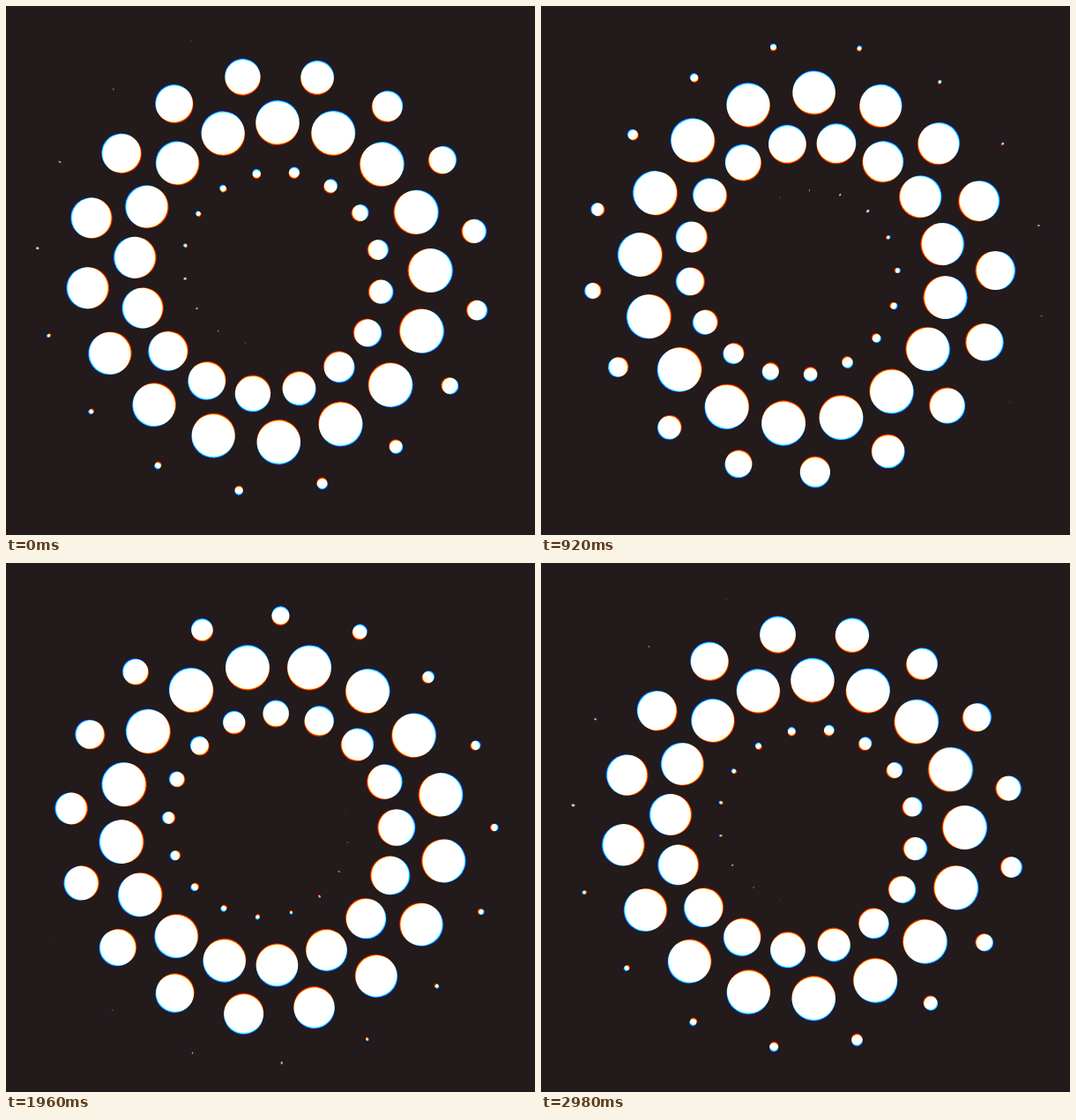
Animation of 600x600 px, one loop 3000 ms. Source, as an HTML page without scripts:

```html
<!DOCTYPE html>
<html lang="en">
<head>
<meta charset="utf-8">
<title>Spiral dots</title>
<style>
html, body { margin: 0; width: 100%; height: 100%; overflow: hidden; background: #231a1b; }
svg { display: block; width: 600px; height: 600px; }

/* one layer per colour channel, each shifted slightly along the radius */
.layer { transform: translate(300px, 300px); mix-blend-mode: lighten; }
.red { fill: #f00; --shift: -1px; }
.green { fill: #0f0; --shift: .2px; }
.blue { fill: #00f; --shift: 1px; }

/* 6 arms of 11 dots make a spiral with 16.5 dots per turn */
.layer g { --g: 0; }
g:nth-child(2) { --g: 1; }
g:nth-child(3) { --g: 2; }
g:nth-child(4) { --g: 3; }
g:nth-child(5) { --g: 4; }
g:nth-child(6) { --g: 5; }
circle { --n: 0; }
circle:nth-child(2) { --n: 1; }
circle:nth-child(3) { --n: 2; }
circle:nth-child(4) { --n: 3; }
circle:nth-child(5) { --n: 4; }
circle:nth-child(6) { --n: 5; }
circle:nth-child(7) { --n: 6; }
circle:nth-child(8) { --n: 7; }
circle:nth-child(9) { --n: 8; }
circle:nth-child(10) { --n: 9; }
circle:nth-child(11) { --n: 10; }

circle {
  --j: calc(var(--g) * 11 + var(--n));
  --speed-up: cubic-bezier(.33333, 0, .66667, 0);
  --slow-down: cubic-bezier(.33333, 1, .66667, 1);
  transform: rotate(calc(var(--j) * 240deg / 11));
  animation: drift 6s linear infinite, swell 6s infinite;
  animation-delay: calc(var(--j) * -1s / 11);
}
@keyframes drift {
  from { cx: calc(70.4px + var(--shift)); }
  to { cx: calc(292.4px + var(--shift)); }
}
/* cubic ease in-out, up and back down */
@keyframes swell {
  0% { r: 0px; animation-timing-function: cubic-bezier(.33333, 0, .66667, 0); }
  25% { r: 12.5px; animation-timing-function: cubic-bezier(.33333, 1, .66667, 1); }
  50% { r: 25px; animation-timing-function: cubic-bezier(.33333, 0, .66667, 0); }
  75% { r: 12.5px; animation-timing-function: cubic-bezier(.33333, 1, .66667, 1); }
  100% { r: 0px; }
}
</style>
</head>
<body>
<svg width="600" height="600">
<rect width="600" height="600" fill="#231a1b"/>
<g class="layer red">
<g><circle/><circle/><circle/><circle/><circle/><circle/><circle/><circle/><circle/><circle/><circle/></g>
<g><circle/><circle/><circle/><circle/><circle/><circle/><circle/><circle/><circle/><circle/><circle/></g>
<g><circle/><circle/><circle/><circle/><circle/><circle/><circle/><circle/><circle/><circle/><circle/></g>
<g><circle/><circle/><circle/><circle/><circle/><circle/><circle/><circle/><circle/><circle/><circle/></g>
<g><circle/><circle/><circle/><circle/><circle/><circle/><circle/><circle/><circle/><circle/><circle/></g>
<g><circle/><circle/><circle/><circle/><circle/><circle/><circle/><circle/><circle/><circle/><circle/></g>
</g>
<g class="layer green">
<g><circle/><circle/><circle/><circle/><circle/><circle/><circle/><circle/><circle/><circle/><circle/></g>
<g><circle/><circle/><circle/><circle/><circle/><circle/><circle/><circle/><circle/><circle/><circle/></g>
<g><circle/><circle/><circle/><circle/><circle/><circle/><circle/><circle/><circle/><circle/><circle/></g>
<g><circle/><circle/><circle/><circle/><circle/><circle/><circle/><circle/><circle/><circle/><circle/></g>
<g><circle/><circle/><circle/><circle/><circle/><circle/><circle/><circle/><circle/><circle/><circle/></g>
<g><circle/><circle/><circle/><circle/><circle/><circle/><circle/><circle/><circle/><circle/><circle/></g>
</g>
<g class="layer blue">
<g><circle/><circle/><circle/><circle/><circle/><circle/><circle/><circle/><circle/><circle/><circle/></g>
<g><circle/><circle/><circle/><circle/><circle/><circle/><circle/><circle/><circle/><circle/><circle/></g>
<g><circle/><circle/><circle/><circle/><circle/><circle/><circle/><circle/><circle/><circle/><circle/></g>
<g><circle/><circle/><circle/><circle/><circle/><circle/><circle/><circle/><circle/><circle/><circle/></g>
<g><circle/><circle/><circle/><circle/><circle/><circle/><circle/><circle/><circle/><circle/><circle/></g>
<g><circle/><circle/><circle/><circle/><circle/><circle/><circle/><circle/><circle/><circle/><circle/></g>
</g>
</svg>
</body>
</html>
```
